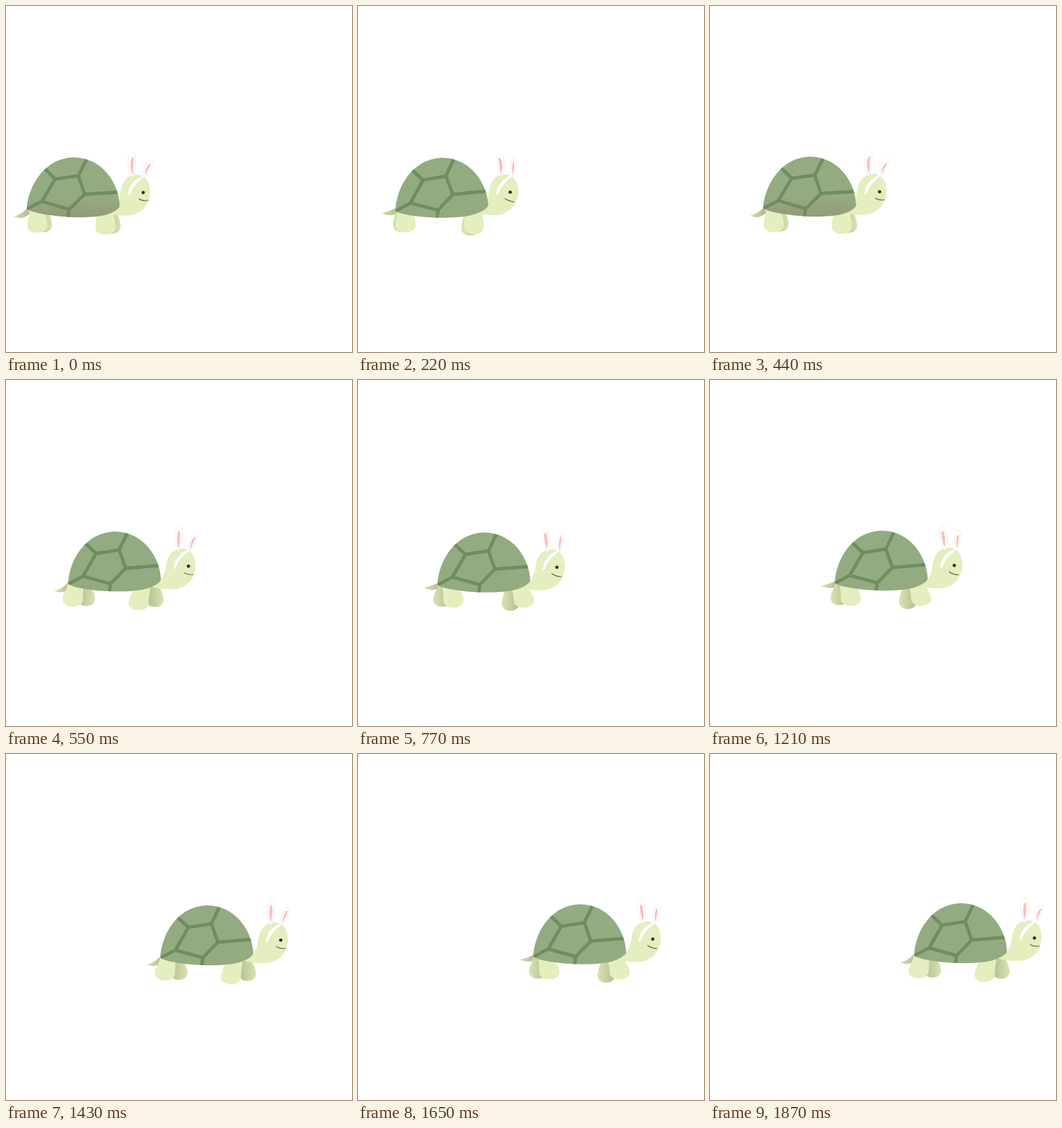
Animation, 480 px wide and 480 px high, one loop 1980 ms. Source, as an HTML page:

```html
<!DOCTYPE html>
<html lang="en">
<head>
<meta charset="utf-8">
<title>Walking turtle</title>
<style>
  html, body { margin: 0; width: 100%; height: 100%; overflow: hidden; background: #fff; }
  svg { display: block; width: 100%; height: 100%; }
  .ear { fill: #fff; stroke: #f4eeed; stroke-width: 1; }
  .pink { fill: #fabfb9; }
  .band { fill: #fff; }
  .mouth { fill: none; stroke: #686c57; stroke-width: 1.1; stroke-linecap: round; }
  .seams { fill: none; stroke: #708d60; stroke-width: 4.6; stroke-linejoin: round; }
  .skin { fill: #e4eebe; }
  .eye { fill: #2c2e25; }
</style>
</head>
<body>
<svg viewBox="0 0 480 480" xmlns="http://www.w3.org/2000/svg">
  <defs>
    <linearGradient id="shadeL">
      <stop offset="0" stop-color="#adb78a"/><stop offset="1" stop-color="#d8e3b3"/>
    </linearGradient>
    <linearGradient id="shadeR">
      <stop offset="0" stop-color="#d8e3b3"/><stop offset="1" stop-color="#adb78a"/>
    </linearGradient>
    <linearGradient id="flat"><stop stop-color="#92ab80"/></linearGradient>
    <linearGradient id="dusk" x2="0" y2="1">
      <stop offset=".68" stop-color="#94ab82"/><stop offset="1" stop-color="#939a79"/>
    </linearGradient>
    <clipPath id="shellClip"><path id="shellEdge"/></clipPath>
  </defs>
  <g id="turtle"></g>
</svg>
<script>
const STEP = 110, STEPS = 18;

// Shapes are relative to the shell's left edge and top.
const SHELL = 'M0 72C2 39 24 1 64 -.5C104 -1 128 35 129 66C128 71 118 77 104 80C85 83.5 55 83.5 30 80C15 78 3 75 0 72Z';
const SEAMS = 'M24 16L39 30L71 25L82 2M71 25L80 50.5L130 46.5M80 50.5L59 72L57.5 84M59 72L21 61.5L39 30M21 61.5L-1 73';
const SKULL = 'M116 74C130 72 135 59 136 47C138 31 147 23 158 23C171 23 177 34 177 47C177 62 166 79.5 145 79.5C134 79.5 124 79 116 76Z';
const BAND = 'M146 51C148 37 156 27 170 24C161 33 153 38 149 51Z';

// Key points of the walk: step, x, y.
const walk = [[0, 29, 211], [4, 74, 210], [7, 110, 212], [11, 173, 209.5], [13, 214, 210.5], [15, 243, 209], [17, 283, 207.5]];

function place(step) {
  const k = Math.max(1, walk.findIndex(p => p[0] >= step));
  const [a, b] = [walk[k - 1], walk[k]];
  const t = (step - a[0]) / (b[0] - a[0]);
  return [1, 2].map(n => a[n] + (b[n] - a[n]) * t);
}

const path = (d, attrs) => `<path d="${d}" ${attrs}/>`;
const fill = id => `fill="url(#${id})"`;

// A tapered leg whose foot swings by dx from its resting place.
function leg(x, dx, half, drop, attrs) {
  const hip = x + dx / 2, foot = x + dx;
  const [l, r, y] = [foot - half, foot + half, 94 + drop];
  return path(`M${hip - 11} 70C${hip - 11} 82 ${l} ${y - 10} ${l} ${y}` +
    `C${l} ${y + 13} ${r} ${y + 13} ${r} ${y}C${r} ${y - 10} ${hip + 11} 82 ${hip + 11} 70Z`, attrs);
}

// A leaf from (x, y) to its tip, bowed sideways by bend.
function leaf(x, y, dx, dy, half, bend, name) {
  const len = Math.hypot(dx, dy);
  const at = (t, side) => `${x + dx * t - dy / len * side} ${y + dy * t + dx / len * side}`;
  return path(`M${x} ${y}C${at(.35, bend - half)} ${at(1, bend - half)} ${at(1, 0)}` +
    `C${at(1, bend + half)} ${at(.35, bend + half)} ${x} ${y}Z`, `class="${name}"`);
}

function ear(x, dx, dy, half, bend) {
  return leaf(x, 27, dx, dy, half, bend, 'ear') +
    leaf(x + dx * .12, 27 + dy * .12, dx * .7, dy * .7, half * .4, bend * .8, 'pink');
}

function drawHead(cos, sway) {
  const tilt = 1 - sway, mouthX = 162 - 4 * tilt;
  return ear(153, 9 * sway - 6, -33 - 2 * sway, 7, -4 * cos) +
    ear(169, 1 + 12 * sway, 5 * sway - 28, 5, -4 * sway) +
    path(BAND, 'class="band"') +
    `<circle class="eye" cx="${165.5 + 2 * sway}" cy="47.7" r="2.3"/>` +
    path(`M${mouthX} 56.5q4 3.5 12.5 ${2 + 3 * tilt}`, 'class="mouth"');
}

function draw(step) {
  const angle = step * Math.PI / 2;
  const cos = Math.cos(angle);
  const near = -Math.sin(angle);
  const far = Math.cos(angle - .94);
  const sway = .5 + .5 * Math.cos(angle - .63);
  const shade = fill(far > 0 ? 'shadeL' : 'shadeR');
  const head = `transform="translate(${-6 * cos * cos})"`;
  const tailY = 79 + 3.5 * far;
  const drop = swing => 2.5 - 2.5 * swing;

  return path(`M-19 ${tailY}Q-9 ${tailY - 2} 0 70L5 76Q-6 ${tailY + 6} -19 ${tailY}Z`, fill('shadeR')) +
    leg(16, 12 * far, 12, -1, shade) +
    leg(111, 12 * far, 12, drop(far), shade) +
    path(SKULL, `class="skin" ${head}`) +
    leg(14.5, 8 * near, 14, 0, 'class="skin"') +
    leg(109, 11 * near, 14, drop(near), 'class="skin"') +
    `<g transform="rotate(${cos} 100 50)">` +
    path(SHELL, fill(cos > .5 ? 'dusk' : 'flat')) +
    path(SEAMS, 'class="seams" clip-path="url(#shellClip)"') + '</g>' +
    `<g ${head}>${drawHead(cos, sway)}</g>`;
}

document.getElementById('shellEdge').setAttribute('d', SHELL);
const turtle = document.getElementById('turtle');
const start = performance.now();
let shown = -1;

function render() {
  const step = Math.floor((performance.now() - start) / STEP) % STEPS;
  if (step !== shown) {
    turtle.setAttribute('transform', `translate(${place(step)})`);
    turtle.innerHTML = draw(step);
    shown = step;
  }
  requestAnimationFrame(render);
}
render();
</script>
</body>
</html>
```
